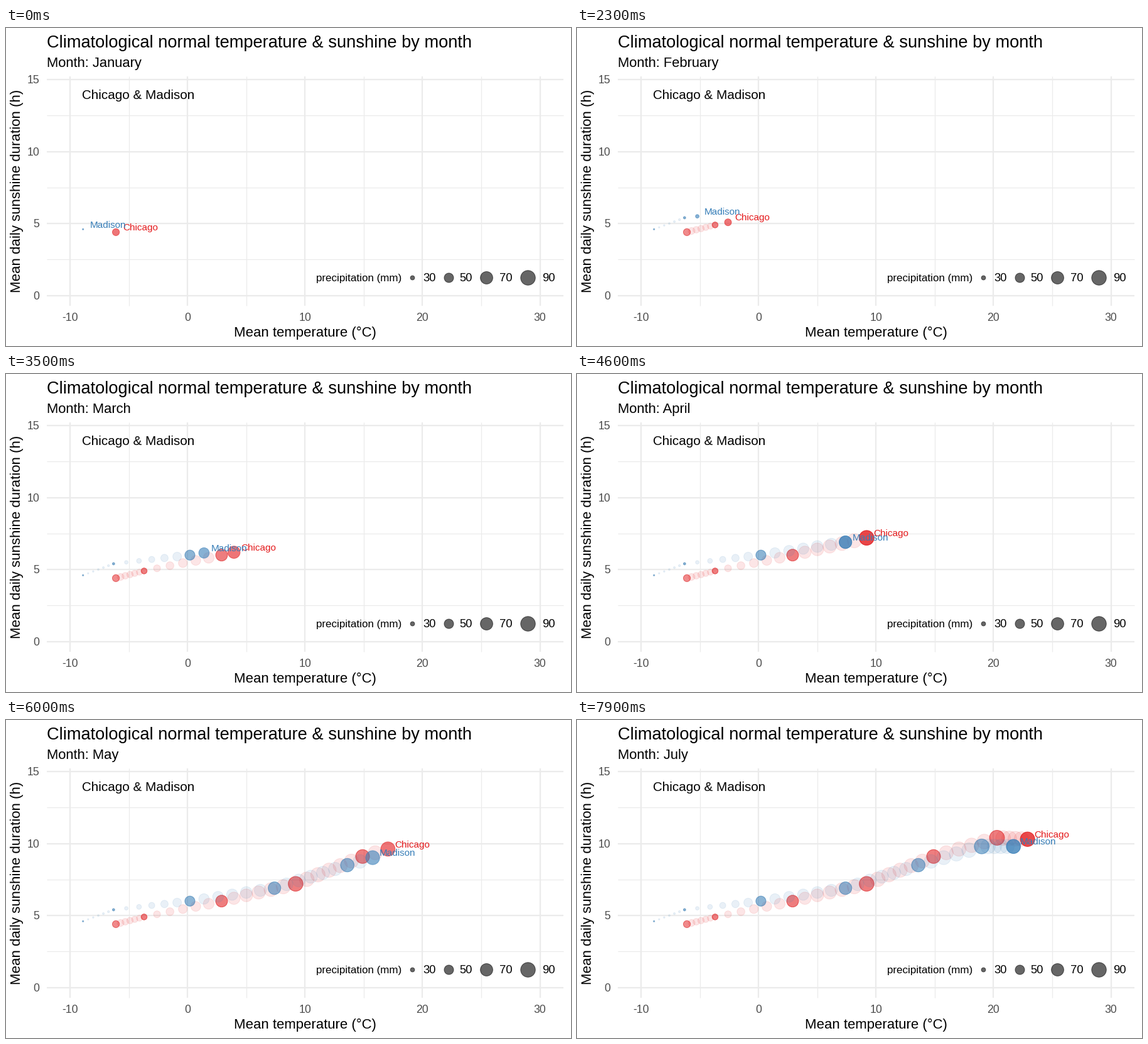
Animation, 900 px wide and 506 px high, one loop 8000 ms. Source, as a matplotlib script:

```python
import numpy as np
import matplotlib.pyplot as plt
from matplotlib.animation import FuncAnimation
from matplotlib.colors import to_rgba

# A power of two keeps the figure size in whole pixels
WIDTH, HEIGHT, DPI = 900, 506, 64
FRAMES, INTERVAL = 80, 100
START_PAUSE = 5
POINT_ALPHA, SHADOW_ALPHA = 0.6, 0.11

MONTHS = ["January", "February", "March", "April", "May", "June", "July"]
# Per month: mean temperature, daily sunshine, dot radius in pixels
CITIES = {
    "Chicago": ("#E41A1C", [(-6.1, 4.4, 6.1), (-3.7, 4.9, 5.2), (2.9, 6.0, 9.9),
                            (9.2, 7.2, 12.2), (14.9, 9.1, 11.5), (20.3, 10.4, 12.4),
                            (22.9, 10.3, 12.0)]),
    "Madison": ("#377EB8", [(-8.9, 4.6, 1.5), (-6.3, 5.4, 2.3), (0.2, 6.0, 8.5),
                            (7.4, 6.9, 10.5), (13.6, 8.5, 11.2), (19.0, 9.8, 12.3),
                            (21.7, 9.8, 11.7)]),
}

# Each month rests, then moves linearly to the next one
HOLD = 6
MOVES = [6, 6, 6, 6, 5, 5]
knots = [0, HOLD - 1]
for move in MOVES:
    knots += [knots[-1] + move, knots[-1] + move + HOLD]
knot_months = np.repeat(np.arange(len(MONTHS)), 2)

plt.rcParams["font.family"] = "Liberation Sans"
fig = plt.figure(figsize=(WIDTH / DPI, HEIGHT / DPI), dpi=DPI, facecolor="white")
ax = fig.add_axes([0, 0, 1, 1])
ax.set_xlim(0, WIDTH)
ax.set_ylim(HEIGHT, 0)
ax.axis("off")


def px(temperature):
    return 289.2 + 18.71 * temperature


def py(hours):
    return 425.6 - 22.9 * hours


def points(pixels):
    return pixels * 72 / DPI


def area(radius):
    return points(2 * np.asarray(radius) - 1) ** 2


def label(x, y, text, size, color="black", **kw):
    kw.setdefault("va", "baseline")
    return ax.text(x, y, text, fontsize=points(size), color=color, **kw)


def grid(xs, ys, width):
    style = dict(colors="#EBEBEB", linewidths=points(width), zorder=0)
    ax.vlines([px(x) for x in xs], 77, 442, **style)
    ax.hlines([py(y) for y in ys], 65, 888, **style)


def state(name, step):
    month = np.interp(step, knots, knot_months)
    columns = np.array(CITIES[name][1]).T
    temp, sun, radius = (np.interp(month, range(len(MONTHS)), c) for c in columns)
    return px(temp), py(sun), radius


grid([-5, 5, 15, 25], [2.5, 7.5, 12.5], 1.2)
grid([-10, 0, 10, 20, 30], [0, 5, 10, 15], 2.3)
for t in (-10, 0, 10, 20, 30):
    label(px(t), 466, str(t), 17.6, "#4D4D4D", ha="center")
for h in (0, 5, 10, 15):
    label(53.5, py(h) + 6.2, str(h), 17.6, "#4D4D4D", ha="right")

label(65, 31, "Climatological normal temperature & sunshine by month", 27.3)
subtitle = label(65, 62, "", 22)
label(476, 491, "Mean temperature (°C)", 22.1, ha="center")
label(28, 259.5, "Mean daily sunshine duration (h)", 22.3, rotation=90,
      ha="right", va="center")
label(121, 112.5, "Chicago & Madison", 20.6)

label(494, 403, "precipitation (mm)", 17)
for x, text_x, radius, amount in [(647, 664.5, 3.9, 30), (704.5, 722.5, 8, 50),
                                  (765, 786, 10.4, 70), (831, 854.5, 12.2, 90)]:
    ax.scatter(x, 397, s=area(radius), facecolor="black", edgecolor="black",
               alpha=POINT_ALPHA, linewidth=points(0.95), zorder=2)
    label(text_x, 403, str(amount), 18.4)

dots = ax.scatter([], [], linewidth=points(0.95), zorder=3)
dots.set_snap(False)
tags = {name: label(0, 0, name, 15.3, color, zorder=4)
        for name, (color, _) in CITIES.items()}


def update(frame):
    now = max(0, frame - START_PAUSE)
    month = int(np.interp(now, knots, knot_months) + 0.5 + 1e-9)
    subtitle.set_text("Month: " + MONTHS[month])

    # Every earlier step leaves a faint mark, so resting places grow darker
    marks, colors = [], []
    for step in range(now + 1):
        alpha = POINT_ALPHA if step == now else SHADOW_ALPHA
        for name, (color, _) in CITIES.items():
            marks.append(state(name, step))
            colors.append(to_rgba(color, alpha))
    marks = np.array(marks)
    dots.set_offsets(marks[:, :2])
    dots.set_sizes(area(marks[:, 2]))
    dots.set_facecolor(colors)
    dots.set_edgecolor(colors)

    for name, tag in tags.items():
        x, y, _ = state(name, now)
        tag.set_position((x + 11, y - 2.7))
    return [dots, subtitle, *tags.values()]


animation = FuncAnimation(fig, update, frames=FRAMES, interval=INTERVAL,
                          repeat=True, repeat_delay=0)
plt.show()
```
